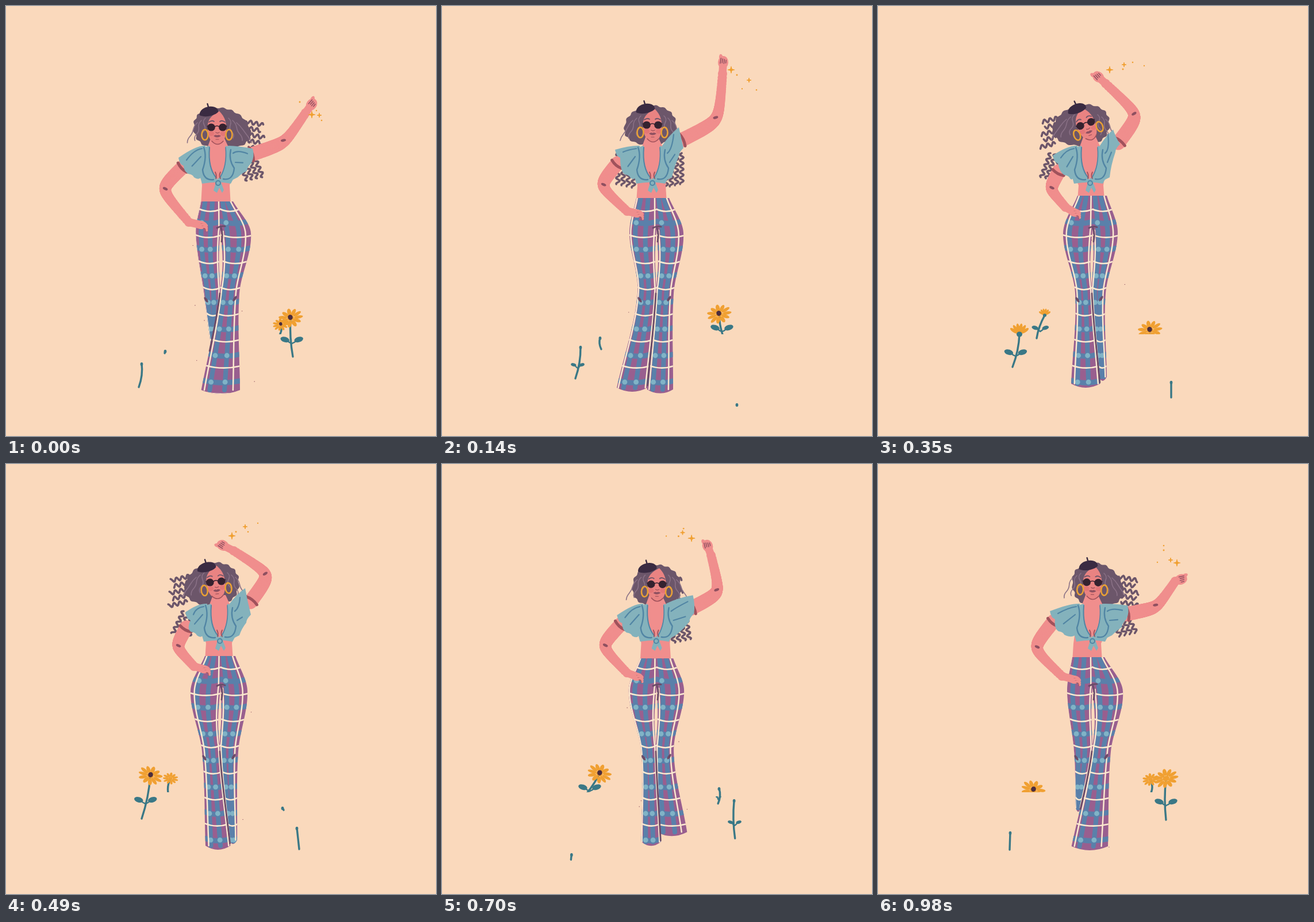
Recreate the animation shown at these times as an HTML page with a canvas. Size 748 px wide and 748 px high, loop 1.05 s.

```html
<!DOCTYPE html>
<html lang="en">
<head>
<meta charset="utf-8">
<title>Dancer and flowers</title>
<style>
html, body { margin: 0; width: 100%; height: 100%; overflow: hidden; background: #fad9bc; }
canvas { display: block; width: 100vw; height: 100vh; }
</style>
</head>
<body>
<canvas id="stage" width="748" height="748"></canvas>
<script>
const ctx = document.getElementById('stage').getContext('2d');
const STEP = 70, COUNT = 15, TAU = Math.PI * 2;
const C = {
  bg: '#fad9bc', skin: '#f08e8d', face: '#e98382', mark: '#8f5060', cuff: '#a0525c',
  top: '#84b2bc', fold: '#5185a4', hair: '#6c566a', shine: '#8a7186', hat: '#3a2b42',
  lens: '#35222f', gold: '#eaa133', plum: '#995f8f', blue: '#5a80aa', sky: '#80b3c6',
  cream: '#fbe8cf', shade: '#6b4c68', stem: '#3a7886', petal: '#f0a032', seed: '#4b2d3e'
};

// Every row starts with its time in steps.
const ARM = loop([ // shoulder, elbow, wrist, hand of the raised arm
  [0, 424, 259, 485, 239, 521, 186, 531, 172],
  [2, 415, 234, 482, 201, 488, 118, 489, 99],
  [5, 418, 238, 455, 190, 396, 135, 384, 124],
  [7, 425, 240, 461, 192, 396, 151, 378, 142],
  [9, 430, 250, 483, 215, 446, 152, 434, 138],
  [12, 438, 252, 482, 242, 506, 179, 513, 163],
  [14, 431, 261, 485, 251, 517, 204, 526, 201]]);
const HIP_ARM = loop([
  [0, 309, 279, 268, 318, 318, 376, 340, 381],
  [2, 306, 273, 273, 312, 322, 357, 340, 361],
  [5, 315, 287, 298, 318, 326, 350, 342, 359],
  [7, 314, 284, 295, 318, 327, 352, 345, 357],
  [9, 314, 281, 280, 318, 324, 363, 340, 369],
  [12, 306, 273, 271, 314, 318, 362, 340, 369],
  [14, 306, 273, 268, 320, 320, 369, 342, 375]]);
const HEAD = loop([ // face x, y, tilt, hat x, y, hair left, right, bottom, swing
  [0, 367, 213, 0, 353, 183, 324, 432, 249, .9],
  [2, 366, 209, 0, 354, 178, 312, 411, 242, 0],
  [5, 362, 207, -.36, 346, 178, 298, 405, 243, -.8],
  [7, 365, 207, -.1, 349, 179, 305, 408, 246, -1],
  [9, 372, 212, -.04, 354, 181, 320, 412, 250, 0],
  [12, 375, 208, .1, 364, 178, 338, 438, 243, .8],
  [14, 373, 208, .03, 366, 176, 336, 433, 249, 1.1]]);
const BLOUSE = loop([ // centre, left sleeve tips, right sleeve tips
  [0, 369, 300, 264, 317, 292, 429, 248, 427, 273],
  [2, 366, 301, 250, 318, 293, 412, 211, 420, 247],
  [5, 369, 304, 260, 324, 294, 409, 215, 421, 240],
  [7, 372, 312, 258, 322, 292, 416, 216, 426, 262],
  [9, 372, 306, 263, 322, 294, 432, 224, 435, 260],
  [12, 374, 302, 261, 318, 291, 441, 237, 442, 262],
  [14, 373, 299, 256, 314, 291, 434, 246, 432, 270]]);
const PANTS = loop([ // waist l, r, y, hip l, r, knee l, r, hem l, r, y of each leg
  [0, 339, 395, 340, 330, 426, 344, 406, 357, 365, 595, 340, 407, 668],
  [2, 338, 395, 334, 326, 420, 340, 403, 304, 357, 664, 357, 402, 667],
  [5, 347, 398, 330, 322, 417, 343, 396, 336, 386, 657, 384, 398, 645],
  [7, 346, 399, 334, 321, 420, 341, 404, 347, 390, 664, 388, 402, 654],
  [9, 345, 403, 337, 323, 420, 345, 403, 347, 381, 658, 380, 428, 638],
  [12, 343, 399, 340, 328, 424, 348, 404, 346, 378, 650, 358, 413, 652],
  [14, 338, 394, 336, 329, 426, 341, 405, 344, 352, 598, 337, 400, 665]]);
const SPARK = loop([ // two stars, three dots
  [0, 532, 189, 545, 190, 511, 167, 549, 199, 540, 182],
  [2, 503, 111, 534, 129, 513, 120, 547, 146, 522, 144],
  [5, 403, 111, 428, 102, 426, 110, 443, 98, 463, 104],
  [7, 393, 125, 416, 109, 400, 118, 421, 118, 438, 103],
  [9, 406, 125, 397, 117, 389, 127, 411, 112, 385, 132],
  [12, 498, 143, 478, 128, 470, 124, 451, 118, 426, 111],
  [14, 520, 172, 509, 167, 497, 150, 497, 142, 486, 171]]);

// Flower paths by age: head x, y, root x, y.
const FLOWERS = [
  { born: 9, size: 1, lean: .35, path: [
    [0, 224, 689, 223, 691], [3, 228, 659, 227, 682], [5, 230, 641, 229, 671],
    [6, 236, 622, 231, 663], [8, 241, 593, 232, 648], [11, 246, 571, 234, 628],
    [13, 251, 542, 236, 617], [15, 274, 535, 240, 593], [18, 267, 551, 251, 570],
    [20, 270, 567, 262, 592]] },
  { born: 2, size: 1, lean: -.3, path: [
    [0, 513, 693, 513, 695], [3, 510, 654, 510, 681], [5, 506, 633, 510, 670],
    [7, 512, 595, 510, 658], [10, 498, 570, 508, 637], [12, 501, 547, 501, 619],
    [13, 495, 543, 499, 610], [15, 482, 536, 491, 580], [18, 473, 564, 478, 590]] },
  { born: 0, size: .62, lean: .1, path: [
    [0, 277, 600, 276, 604], [2, 275, 577, 277, 597], [5, 290, 538, 276, 578],
    [7, 286, 547, 282, 572], [9, 288, 568, 286, 590]] },
  { born: 7, size: .66, lean: -.2, path: [
    [0, 481, 598, 483, 602], [2, 481, 581, 482, 598], [5, 483, 533, 476, 575],
    [7, 474, 549, 475, 572], [8, 478, 554, 475, 574]] }
];

function loop(rows) {
  const shift = (r, d) => [r[0] + d, ...r.slice(1)];
  return [...rows.slice(-2).map(r => shift(r, -COUNT)), ...rows,
    ...rows.slice(0, 2).map(r => shift(r, COUNT))];
}

// Smooth curve through rows of [t, ...values].
function curve(rows, t) {
  const n = rows.length;
  t = clamp(t, rows[0][0], rows[n - 1][0]);
  let i = 0;
  while (i < n - 2 && rows[i + 1][0] <= t) i++;
  const a = rows[Math.max(i - 1, 0)], b = rows[i], c = rows[i + 1], d = rows[Math.min(i + 2, n - 1)];
  const h = c[0] - b[0], u = (t - b[0]) / h, u2 = u * u, u3 = u2 * u;
  return b.slice(1).map((v, j) => {
    j++;
    const m0 = (c[j] - a[j]) / (c[0] - a[0]), m1 = (d[j] - b[j]) / (d[0] - b[0]);
    return (2 * u3 - 3 * u2 + 1) * v + (u3 - 2 * u2 + u) * h * m0 +
      (3 * u2 - 2 * u3) * c[j] + (u3 - u2) * h * m1;
  });
}
function clamp(v, lo = 0, hi = 1) { return Math.max(lo, Math.min(hi, v)); }
function mix(a, b, t) { return a + (b - a) * t; }

function fill(d, color) { ctx.fillStyle = color; ctx.fill(new Path2D(d)); }
function line(d, color, w = 2) {
  ctx.strokeStyle = color; ctx.lineWidth = w; ctx.stroke(new Path2D(d));
}
function oval(x, y, rx, ry, color, rot = 0) {
  ctx.beginPath(); ctx.ellipse(x, y, rx, ry, rot, 0, TAU);
  ctx.fillStyle = color; ctx.fill();
}
function ring(x, y, rx, ry, color, w) {
  ctx.beginPath(); ctx.ellipse(x, y, rx, ry, 0, 0, TAU);
  ctx.strokeStyle = color; ctx.lineWidth = w; ctx.stroke();
}
function poly(pts) { return 'M' + pts.map(p => p.join(' ')).join('L'); }
function local(x, y, rot, draw) {
  ctx.save(); ctx.translate(x, y); ctx.rotate(rot); draw(); ctx.restore();
}

function flower({ born, size, lean, path }, k) {
  const end = path[path.length - 1][0];
  for (const age of [k - born, k - born + COUNT]) {
    if (age < 0 || age > end) continue;
    const small = size < 1, stage = small ? age + 5 : age;
    const [hx, hy, rx, ry] = curve(path, age);
    ctx.save();
    if (stage >= (small ? 12 : 15)) {
      ctx.beginPath(); ctx.rect(0, 0, 748, 571); ctx.clip();
    }
    const bend = (hx + rx) / 2 + (born % 2 ? 5 : -4) * (stage > 5 ? 1 : 0);
    line(`M${hx} ${hy}Q${bend} ${mix(hy, ry, .5)} ${rx} ${ry}`, C.stem, 3.4);
    if (stage < 9) oval(hx, hy + 1, 2.4, 3, C.stem);
    const leaf = clamp((stage - 6.2 - (small ? .8 : 0)) / 3) * (small ? .75 : 1);
    if (leaf > 0 && !(small && stage >= 12)) {
      const x = mix(hx, rx, .55), y = mix(hy, ry, .6);
      for (const s of [-1, 1]) {
        line(`M${x} ${y + 4}Q${x + s * 4 * leaf} ${y + 3} ${x + s * 8 * leaf} ${y - 1}`, C.stem, 2.4);
        oval(x + s * 12 * leaf, y - 3 * leaf, 8 * leaf, 4.6 * leaf, C.stem, -s * .3);
      }
    }
    if (stage >= 9 && stage < 11.6) cup(hx, hy, size);
    if (stage >= 11.6) bloom(hx, hy, size, lean, stage >= 12.7);
    ctx.restore();
  }
}
function cup(x, y, s) {
  for (let i = 0; i < 6; i++) {
    const a = -Math.PI / 2 + (i - 2.5) * .4;
    oval(x + Math.cos(a) * 11 * s, y + Math.sin(a) * 11 * s, 8 * s, 2.8 * s, C.petal, a);
  }
  oval(x, y, 5 * s, 4.5 * s, C.stem);
}
function bloom(x, y, s, lean, seeded) {
  local(x, y, lean, () => {
    ctx.scale(s, s * .76);
    for (let i = 0; i < 11; i++) {
      const a = i * TAU / 11 + .2, r = i % 2 ? 13 : 14;
      oval(Math.cos(a) * r, Math.sin(a) * r, 8, 3.5, C.petal, a);
    }
    oval(0, 0, 6, 6, C.petal);
    if (seeded) oval(0, -2, 4.2, 6, C.seed);
  });
}

function hairBack(h) {
  const [hx, hy, , , , l, r, bottom, swing] = h;
  const cx = (l + r) / 2, rx = (r - l) / 2, t = hy - 36, cy = (t + bottom) / 2, ry = (bottom - t) / 2;
  for (const side of [-1, 1]) {
    const edge = side < 0 ? l : r, push = side * swing;
    for (let i = 0; i < 5; i++)
      curl(edge - side * (14 - i), hy - 12 + i * 11, side < 0 ? Math.PI - .25 : .2, 34 * clamp(push) - i % 2 * 6);
    for (let i = 0; i < 4; i++)
      curl(edge - side * (i * 9 - 6 + 10 * clamp(push)), 256 + i * 2, Math.PI / 2 - swing * .45,
        (54 - 10 * Math.abs(swing)) * clamp((push + .8) / .8));
  }
  const pts = [];
  for (let i = 0; i < 120; i++) {
    const a = i / 120 * TAU, s = Math.sin(a), b = 1 + .03 * Math.sin(a * 17);
    const mid = cx + (hx - cx) * clamp(.3 - s) * .8;
    pts.push([mid + rx * (.9 + .1 * s) * Math.cos(a) * b, cy + ry * Math.sign(s) * Math.abs(s) ** .85 * b]);
  }
  fill(poly(pts) + 'Z', C.hair);
  for (const side of [-1, 1])
    for (let i = 0; i < 3; i++) {
      const x = hx + side * (20 + i * 7), out = (side < 0 ? l - hx : r - hx) * (.1 + i * .12);
      line(`M${x} ${hy - 18 + i * 4}q${side * 6} 5 ${out * .5} 12t${out * .4} 12t${out * .3} 11`, C.shine, 1.6);
    }
}
function curl(x, y, dir, len) {
  if (len < 4) return;
  const pts = [], c = Math.cos(dir), s = Math.sin(dir);
  for (let d = 0; d <= len; d += 1.5) {
    const w = Math.sin(d * .62) * 3.2;
    pts.push([x + c * d - s * w, y + s * d + c * w]);
  }
  line(poly(pts), C.hair, 3.6);
}

function face([hx, hy, tilt, bx, by]) {
  local(hx, hy, tilt, () => {
    fill('M4 -30C-6 -25 -16 -18 -16 -4C-17 10 -12 27 1 28C13 27 17 10 16 -3C16 -16 10 -24 4 -30Z', C.face);
    line('M-9 22Q1 33 11 22', C.cuff, 1.6);
    oval(-10, 9, 5, 4, '#e37677'); oval(11, 9, 5, 4, '#e37677');
    for (const s of [-1, 1]) {
      line(`M${s * 5} -12Q${s * 9} -15 ${s * 14} -11`, C.hair, 1.8);
      oval(s * 10, -2, 6.8, 6.6, C.lens);
      ring(s * 21, 11, 5.5, 9, C.gold, 2.6);
    }
    line('M-17 -4L-4 -3Q0 -6 4 -3L17 -4', C.lens, 1.6);
    line('M-2 7Q1 9 4 7', C.cuff, 1.4);
    fill('M-6 13Q-2 10 0 12Q3 10 7 13Q0 18 -6 13Z', C.mark);
    line('M-2 19H3', C.cuff, 1.2);
  });
  local(bx, by, -.12 + tilt * .4, () => {
    fill('M-17 5C-17 -3 -8 -8 2 -8C11 -8 17 -3 16 3C10 9 -8 11 -17 5Z', C.hat);
    line('M0 -7L-1 -13', C.hat, 2.4);
  });
}

function arm([sx, sy, ex, ey, wx, wy, hx, hy], r0, r1) {
  const at = t => {
    const a = (1 - t) ** 2, b = 8 * t * (1 - t), c = t * t, n = a + b + c;
    return [(a * sx + b * ex + c * wx) / n, (a * sy + b * ey + c * wy) / n];
  };
  for (let i = 0; i <= 90; i++) oval(...at(i / 90), mix(r0, r1, i / 90), mix(r0, r1, i / 90), C.skin);
  const [mx, my] = at(.5);
  oval(mx, my - 2, 4.6, 2.3, C.mark, Math.atan2(wy - sy, wx - sx) * .3);
  const dir = Math.atan2(hy - wy, hx - wx);
  line(`M${wx} ${wy}L${hx} ${hy}`, C.skin, r1 * 1.7);
  return dir;
}
function fist([, , , , , , x, y], dir) {
  local(x, y, dir, () => {
    oval(1, 0, 11, 9, C.skin);
    oval(9, -4, 6, 3.4, C.skin, -.2);
    for (let i = 0; i < 4; i++) line(`M${-1 + i % 2} ${-5 + i * 3.2}L${8 - i} ${-4 + i * 3}`, C.mark, 1.5);
  });
}
function palm([, , , , , , x, y], dir) {
  oval(x - 2, y, 10, 7, C.skin, dir);
  for (let i = 0; i < 3; i++) {
    const fx = x + 1 + i * 2, fy = y - 4 + i * 4;
    line(`M${fx - 4} ${fy}Q${fx + 3} ${fy - 2} ${fx + 8 - i * 2} ${fy + 5}`, C.skin, 4.4);
    line(`M${fx - 2} ${fy + 2}Q${fx + 3} ${fy + 1} ${fx + 6 - i * 2} ${fy + 7}`, C.cuff, 1.1);
  }
}
function cuff([sx, sy, ex, ey], r) {
  const d = Math.hypot(ex - sx, ey - sy), ux = (ex - sx) / d, uy = (ey - sy) / d;
  const x = sx + ux * 3, y = sy + uy * 3;
  line(`M${x - uy * r} ${y + ux * r}Q${x + ux * 4} ${y + uy * 4} ${x + uy * r} ${y - ux * r}`, C.cuff, 5);
}

function torso(x, p) {
  const [wl, wr, wy] = p;
  fill(`M${x - 30} 290L${wl + 2} 312L${wl} ${wy + 8}H${wr - 4}L${wr - 6} 312L${x + 26} 290Z`, C.skin);
  fill(`M${x - 12} 228L${x - 20} 250V300H${x + 20}V250L${x + 10} 228Z`, C.skin);
}
function blouse([x, ax, ay, bx, by, cx, cy, dx, dy]) {
  fill(`M${x - 36} 249L${x - 15} 243Q${x - 18} 285 ${x - 1} 302Q${x + 17} 280 ${x + 13} 243L${x + 27} 248
    L${x + 29} 296L${x + 22} 309Q${x} 304 ${x - 28} 309L${x - 32} 295Z`, C.top);
  fill(`M${x - 22} 243Q${x - 38} 242 ${ax} ${ay}Q${ax + 2} ${ay + 12} ${ax + 9} ${ay + 14}
    Q${bx - 8} ${by - 5} ${bx} ${by}Q${bx + 8} ${by + 1} ${bx + 10} ${by + 6}Q${x - 30} 306 ${x - 26} 290Z`, C.top);
  fill(`M${x + 17} 243Q${mix(x + 20, cx, .4)} ${mix(238, cy, .55)} ${cx} ${cy}Q${cx + 4} ${mix(cy, dy, .5)} ${dx} ${dy}
    Q${dx - 8} ${dy + 8} ${dx - 8} ${dy + 14}Q${dx - 16} ${mix(dy, 302, .6)} ${x + 34} 298L${x + 22} 304Z`, C.top);
  line(`M${x - 15} 246Q${x - 18} 282 ${x - 3} 299`, C.fold, 2);
  line(`M${x + 13} 246Q${x + 16} 278 ${x + 3} 299`, C.fold, 1.6);
  line(`M${x - 25} 246Q${x - 19} 262 ${x - 27} 285Q${x - 25} 304 ${x - 8} 302`, C.fold, 2.4);
  line(`M${x + 22} 250Q${x + 18} 268 ${x + 28} 282Q${x + 26} 304 ${x + 9} 301`, C.fold, 2.4);
  line(`M${x - 28} 248Q${x - 42} 250 ${ax + 14} ${ay + 4}M${x - 30} 262L${mix(x - 30, bx, .7)} ${mix(258, by, .6)}`, C.fold, 2.2);
  line(`M${x + 26} 256Q${x + 34} 250 ${cx - 9} ${mix(cy, dy, .35)}M${x + 30} 272L${dx - 15} ${mix(dy, 272, .45)}`, C.fold, 2.2);
  line(`M${x - 5} 289Q${x - 2} 295 ${x - 4} 300M${x + 4} 289Q${x + 1} 295 ${x + 4} 300`, C.cuff, 1.8);
  fill(`M${x - 3} 304L${x - 8} 321L${x - 2} 325L${x + 2} 316L${x + 7} 325L${x + 10} 320L${x + 4} 304Z`, C.top);
  ring(x, 308, 4, 4, C.fold, 2);
}

// One trouser leg with its plaid; left and right are edges by height.
function leg(left, right, top, hem, stripes) {
  const ys = [];
  for (let y = top; y < hem; y += 4) ys.push(y);
  ys.push(hem);
  const along = (u, from = top) => ys.filter(y => y >= from).map(y => [mix(left(y), right(y), u), y]);
  const a = left(hem), b = right(hem);
  ctx.save();
  const shape = new Path2D(`${poly(along(0))}Q${(a + b) / 2} ${hem + 14} ${b} ${hem}` +
    poly(along(1).reverse()).replace('M', 'L') + 'Z');
  ctx.fillStyle = C.plum; ctx.fill(shape); ctx.clip(shape);
  const across = (y, w, color) => {
    const l = left(y), r = right(y);
    line(`M${l} ${y - 2}Q${(l + r) / 2} ${y + 6} ${r} ${y - 1}`, color, w);
  };
  const bands = [.22, .6];
  for (const u of bands) line(poly(along(u)), C.blue, 8);
  for (let y = 376; y < hem + 8; y += 46.2) {
    across(y, 9, C.blue);
    for (const u of bands)
      if (y > 400 || u < .5) oval(mix(left(y), right(y), u), y + 1, 4.4, 4.4, C.sky);
  }
  for (let y = 355; y < hem + 8; y += 45.4) across(y, 2.6, C.cream);
  for (const [u, from] of stripes) line(poly(along(u, from)), C.cream, 2.5);
  ctx.restore();
}
function pants(p, swing, k) {
  const [wl, wr, wy, hl, hr, kl, kr, al, ar, ay, bl, br, by] = p;
  const edge = (...rows) => y => curve(rows, y)[0];
  const gap = y => y > 388 && y < 490 ? 2.6 * Math.sin((y - 388) / 102 * Math.PI) : -.4;
  const aIn = edge([wy, 372], [388, 373], [500, 372], [ay, ar]);
  const bIn = edge([wy, 372], [388, 373], [500, 372], [by, bl]);
  const aLeft = edge([wy, wl], [395, hl], [500, kl], [ay, al]);
  const bRight = edge([wy, wr], [395, hr], [500, kr], [by, br]);
  const aRight = y => aIn(y) - gap(y), bLeft = y => bIn(y) + gap(y);
  const drawA = () => leg(aLeft, aRight, wy, ay, [[.93, 0], [.05 - .08 * swing, 0]]);
  const drawB = () => leg(bLeft, bRight, wy, by, [[.08, 390], [.82, 0]]);
  const crossed = k > 10 || k < 2;
  if (crossed) { drawA(); drawB(); } else { drawB(); drawA(); }
  const seam = crossed ? bIn : aIn, pts = [];
  for (let y = 500, end = crossed ? 605 : ay; y < end; y += 5) pts.push([seam(y), y]);
  line(poly(pts), C.shade, 2.8);
  line(`M367 386Q374 382 381 ${384 - swing}M374 386Q378 396 375 410`, C.shade, 2.8);
  oval(kl + 4, 511, 2.2, 5.5, C.shade, -.6);
  oval(kr - 8, 509, 2.2, 5.5, C.shade, .6);
}

function star(x, y, r) {
  fill(`M${x} ${y - r}Q${x} ${y} ${x + r} ${y}Q${x} ${y} ${x} ${y + r}Q${x} ${y} ${x - r} ${y}Q${x} ${y} ${x} ${y - r}Z`, C.petal);
  line(`M${x - r * .7} ${y}H${x + r * .7}M${x} ${y - r * .7}V${y + r * .7}`, C.petal, 1.7);
}
function specks(k) {
  let seed = k * 977 + 31;
  const rnd = () => (seed = seed * 16807 % 2147483647) / 2147483647;
  rnd();
  for (let i = 0; i < 6; i++) oval(320 + rnd() * 115, 400 + rnd() * 285, .7, .7, C.mark);
}

function draw(k) {
  const at = rows => curve(rows, k);
  const head = at(HEAD), p = at(PANTS), b = at(BLOUSE), up = at(ARM), hip = at(HIP_ARM), sp = at(SPARK);
  ctx.fillStyle = C.bg;
  ctx.fillRect(0, 0, 748, 748);
  ctx.lineCap = ctx.lineJoin = 'round';
  specks(k);
  FLOWERS.forEach(f => flower(f, k));
  hairBack(head);
  torso(b[0], p);
  pants(p, head[8], k);
  fist(up, arm(up, 12.5, 8));
  palm(hip, arm(hip, 12, 8));
  cuff(up, 12);
  cuff(hip, 11);
  blouse(b);
  face(head);
  star(sp[0], sp[1], 7);
  star(sp[2], sp[3], 4.5);
  for (let i = 4; i < 10; i += 2) oval(sp[i], sp[i + 1], 1.8 - i * .08, 1.8 - i * .08, C.petal);
}

const start = performance.now();
let shown = -1;
function tick() {
  const k = Math.floor((performance.now() - start) / STEP) % COUNT;
  if (k !== shown) draw(shown = k);
  requestAnimationFrame(tick);
}
tick();
</script>
</body>
</html>
```
